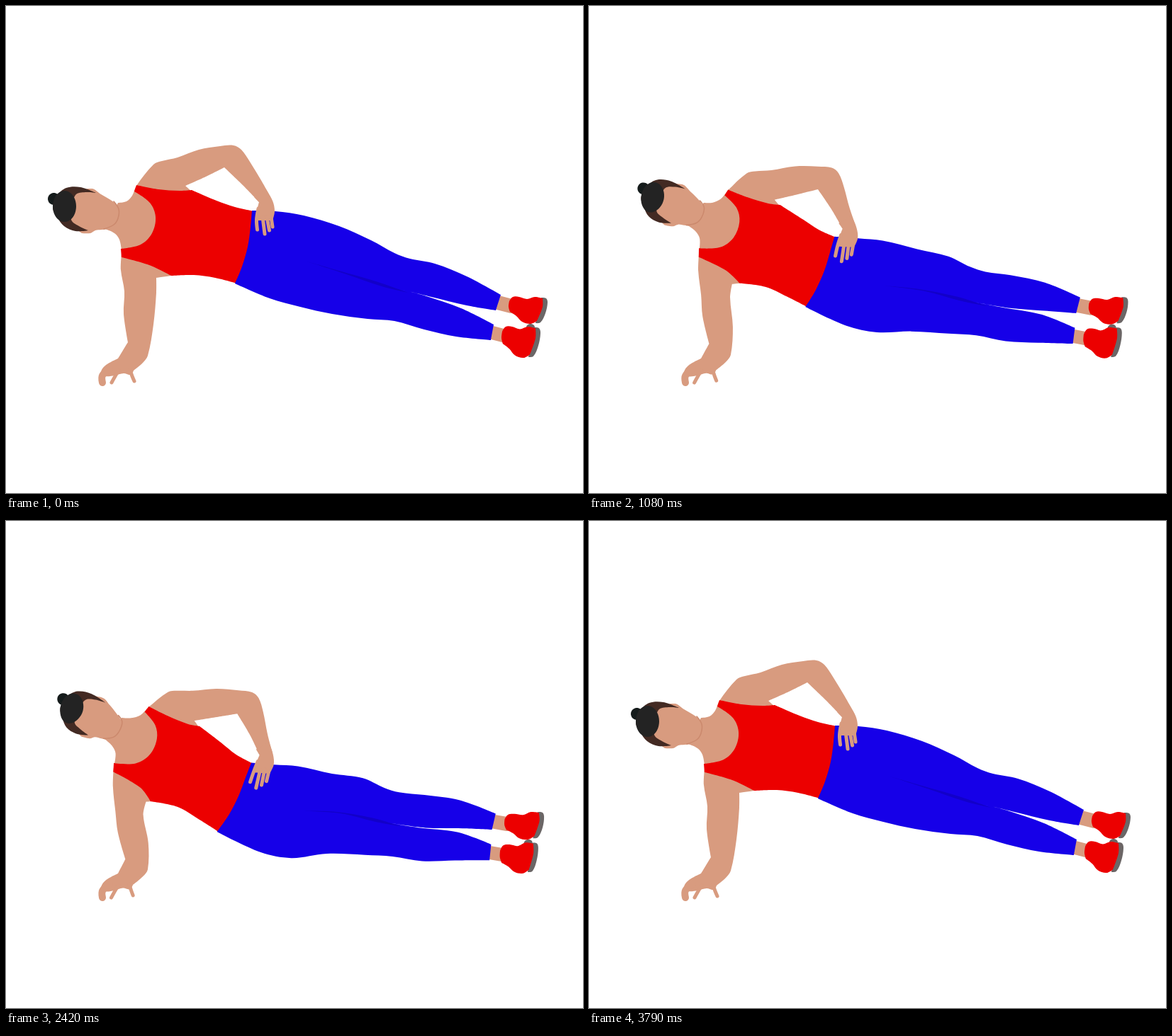
An HTML page with a canvas that plays this animation: 814 by 688 pixels, repeating every 3830 ms.

```html
<!DOCTYPE html>
<html lang="en">
<head>
<meta charset="utf-8">
<title>Side plank hip dips</title>
<style>
html, body { margin: 0; width: 100%; height: 100%; overflow: hidden; background: #fff; }
canvas { display: block; }
</style>
</head>
<body>
<canvas id="stage" width="814" height="688"></canvas>
<script>
const ctx = document.getElementById('stage').getContext('2d');
const LOOP = 3830, FPS = 24, LOWEST_STEP = 47, HALF_STEPS = 44;
const SKIN = '#d89b7f', RED = '#ec0000', BLUE = '#1600e8', GREY = '#6b6666';

// Joints: x, y when raised, then the shift when lowered and an optional outward swing.
const joints = [
  // head and neck
  [59, 268, 16, -25], [127, 264, 15, -8], [116, 317, 0, -16], [159, 289, 5, -4],
  [158, 278, 6, 0], [160, 330, -6, -2],
  // shoulder, elbow, hand on hip
  [184, 254, 19, 10], [220, 219, 23, 23], [253, 254, 14, 31],
  [322, 198, 27, 50, 18], [308, 228, 19, 49, 12], [379, 290, -2, 60, 6], [365, 324, -14, 61],
  // torso
  [162, 343, -11, -1], [211, 298, 2, 11], [233, 381, -32, 17], [347, 289, -1, 58], [323, 392, -28, 52],
  // legs and feet
  [420, 296, -9, 56], [372, 413, -14, 61], [570, 357, -17, 29], [553, 399, -10, 31], [548, 445, -3, 32],
  [698, 408, -8, 6], [684, 472, -2, 8], [757, 412, -6, -1], [739, 497, -1, 0],
  // supporting arm
  [167, 403, -14, 8], [212, 384, -16, 14], [172, 475, -4, 3], [200, 495, 0, -2], [158, 498, 0, 0], [136, 534, 0, 0]
];

// Outlines are smooth curves through a few points; "!" marks a corner.
function outline(color, text) {
  const items = text.trim().split(/\s+/);
  return {
    color,
    points: items.map(item => item.replace('!', '').split(',').map(Number)),
    corners: items.map(item => item.endsWith('!'))
  };
}

const limb = (color, width, text) => ({ ...outline(color, text), width });

function ellipse(color, cx, cy, rx, ry) {
  const points = Array.from({ length: 10 }, (_, i) => {
    const angle = i * Math.PI / 5;
    return [cx + rx * Math.cos(angle), cy + ry * Math.sin(angle)];
  });
  return { color, points, corners: [] };
}

function shoe(left, top, stretch) {
  const place = part => ({ ...part, points: part.points.map(([x, y]) => [left + x, top + y * stretch]) });
  return [
    outline(GREY, '46,1! 53,2 55,8 52,23 45,36 38,37!'),
    outline(RED, '1,6! 6,0 15,0 26,3 37,0 48,2! 48,14 40,34! 31,38 19,35 11,27 2,21! 0,14')
  ].map(place);
}

const parts = [
  // Supporting arm and hand
  outline(SKIN, `163,350! 162,373 167,403 166,435 172,475! 158,498! 140,508 134,518 140,523 153,522
    166,519 176,521 180,515! 193,504 200,494 208,450 212,405 212,384! 233,381! 200,340!`),
  limb(SKIN, 10, '146,513 136,522 136,532'),
  limb(SKIN, 5, '159,515 154,523 149,532'),
  limb(SKIN, 5, '175,514 178,523 181,530'),
  // Neck, shoulder and upper arm
  outline(SKIN, `158,278! 170,276 178,268 184,254 208,224 220,219 242,214 272,203 302,198 321,197
    332,203 344,220 361,248 375,273! 357,277! 335,254 308,228! 282,241 253,254! 262,262!
    225,300! 205,345! 163,346! 160,330 153,321 140,315!`),
  // Feet
  limb(SKIN, 20, '690,418 713,424'),
  limb(SKIN, 19, '680,460 703,466'),
  ellipse(GREY, 740, 454, 6, 5),
  ...shoe(709, 411, 1),
  ...shoe(699, 453, 1.16),
  // Tank top, tucked under the waistband
  outline(RED, `184,253! 215,259 245,261 262,260! 297,275 323,284 350,290! 348,312 344,340 326,392!
    295,384 265,380 233,381! 202,366 163,355! 162,343! 190,337 206,321 211,298 203,278 181,262!`),
  // Leggings
  outline(BLUE, `347,289! 380,290 420,296 470,311 515,331 548,349 570,357 605,364 650,382 698,408! 691,430!
    650,423 600,411 553,399! 590,409 642,427 688,450! 684,472! 635,467 590,457
    548,445 510,442 460,435 415,425 372,413 323,392! 333,368 341,340 345,312`),
  outline('#1200c9', '425,361! 470,374 525,390 567,405! 530,396 480,379'),
  // Head
  outline(SKIN, `90,262! 121,258 134,266 146,273 156,281 160,293 156,306
    147,314 135,316 126,317 119,321 107,321! 85,305!`),
  limb('#cb896d', 1.5, '152,276 159,287 158,300 152,309 138,315'),
  outline('#432a23', `127,264! 112,263 98,267 94,285 92,302 103,311 116,317!
    98,318 82,311 72,298 66,285 72,268 85,257 105,256`),
  ellipse('#151b1b', 67.5, 272.5, 8.5, 8.5),
  ellipse('#232323', 82.5, 283, 16.5, 22),
  // Hand on the hip
  outline(SKIN, '366,258! 376,275 379,290 376,303! 353,303! 355,285 357,277! 350,270!'),
  limb(SKIN, 5, '356,286 353.5,302 354.5,316'),
  ...[[362, 365, 322], [368, 371.5, 317], [374, 376, 312]].map(
    ([knuckle, tip, end]) => limb(SKIN, 5, `${knuckle},298 ${tip},${end}`))
];

// How far the hips have dropped: 0 raised, 1 lowered.
function dropAt(step) {
  const q = Math.max(0, 1 - Math.abs(step - LOWEST_STEP) / HALF_STEPS);
  const s = (1 - Math.cos(Math.PI * q)) / 2;
  return s * (1.4 - 0.4 * s);
}

// Moves a point with the joints: a local turn and shift, weighted by nearness.
function warp([x, y], drop) {
  let total = 0, px = 0, py = 0, qx = 0, qy = 0;
  const near = joints.map(([jx, jy, dx, dy, swing = 0]) => {
    const w = ((x - jx) ** 2 + (y - jy) ** 2 + 0.01) ** -1.5;
    const mx = jx + dx * drop + swing * drop * (1 - drop), my = jy + dy * drop;
    total += w; px += w * jx; py += w * jy; qx += w * mx; qy += w * my;
    return [w, jx, jy, mx, my];
  });
  px /= total; py /= total; qx /= total; qy /= total;
  let cos = 0, sin = 0, norm = 0;
  for (const [w, jx, jy, mx, my] of near) {
    const ax = jx - px, ay = jy - py, bx = mx - qx, by = my - qy;
    cos += w * (ax * bx + ay * by);
    sin += w * (ax * by - ay * bx);
    norm += w * (ax * ax + ay * ay);
  }
  const vx = x - px, vy = y - py;
  return [qx + (cos * vx - sin * vy) / norm, qy + (sin * vx + cos * vy) / norm];
}

function handle(points, i, isEnd, toward) {
  const n = points.length, p = points[i];
  if (isEnd) return p;
  const before = points[(i + n - 1) % n], after = points[(i + 1) % n];
  const vx = after[0] - before[0], vy = after[1] - before[1];
  const next = toward > 0 ? after : before;
  const reach = toward * Math.hypot(next[0] - p[0], next[1] - p[1]) / 3 / (Math.hypot(vx, vy) || 1);
  return [p[0] + vx * reach, p[1] + vy * reach];
}

function drawPart({ color, width, points: rest, corners }, drop) {
  const points = rest.map(point => warp(point, drop)), n = points.length;
  const isEnd = i => corners[i] || (width && (i === 0 || i === n - 1));
  ctx.beginPath();
  ctx.moveTo(...points[0]);
  for (let i = 0; i < (width ? n - 1 : n); i++) {
    const j = (i + 1) % n;
    ctx.bezierCurveTo(...handle(points, i, isEnd(i), 1), ...handle(points, j, isEnd(j), -1), ...points[j]);
  }
  if (width) {
    ctx.strokeStyle = color;
    ctx.lineWidth = width;
    ctx.stroke();
  } else {
    ctx.fillStyle = color;
    ctx.fill();
  }
}

function render(now) {
  const step = Math.floor((now % LOOP) * FPS / 1000 + 0.1);
  const drop = dropAt(step);
  ctx.fillStyle = '#fff';
  ctx.fillRect(0, 0, 814, 688);
  for (const part of parts) drawPart(part, drop);
  requestAnimationFrame(render);
}

ctx.lineCap = 'round';
ctx.lineJoin = 'round';
requestAnimationFrame(render);
</script>
</body>
</html>
```
